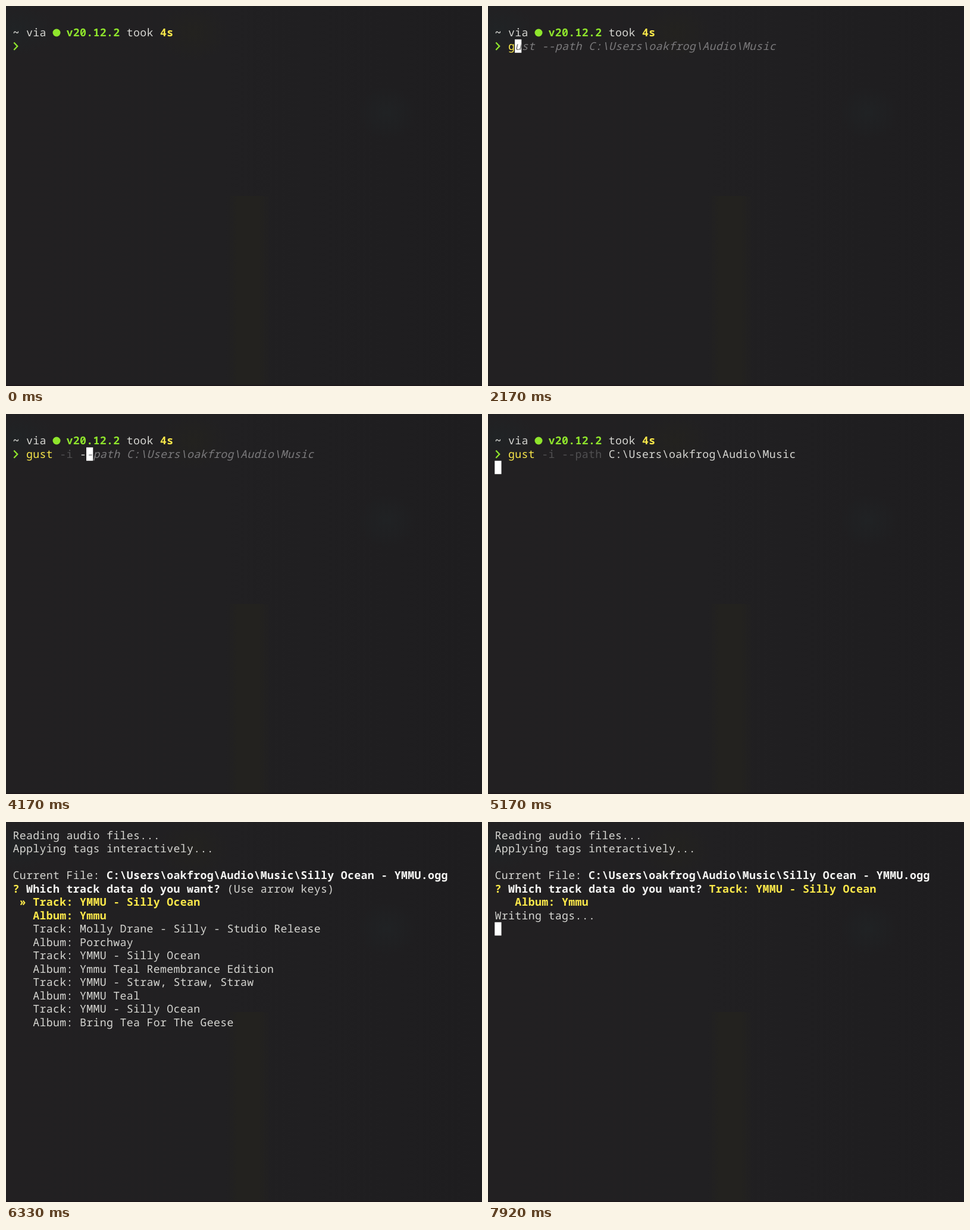
These frames come from a looping animation (800 px wide and 640 px high, 8 s). An HTML page with a canvas:

```html
<!DOCTYPE html>
<html lang="en">
<head>
<meta charset="utf-8">
<title>Terminal session</title>
<style>
  html, body { margin: 0; width: 100%; height: 100%; overflow: hidden; }
  body {
    background:
      linear-gradient(#1d181b, #1d181b) 0 638px / 800px 2px no-repeat,
      radial-gradient(ellipse 70px 45px at 15px 40px, #202325 0%, transparent 100%),
      radial-gradient(ellipse 60px 50px at 315px 45px, #23221f 0%, transparent 100%),
      radial-gradient(ellipse 50px 45px at 640px 180px, #202224 0%, transparent 100%),
      linear-gradient(90deg, transparent 370px, #23221f 390px 425px, transparent 445px) 0 320px no-repeat,
      linear-gradient(90deg, #222022, #212022 45%, #1e1d1f);
  }
  canvas { display: block; }
</style>
</head>
<body>
<canvas id="screen" width="800" height="640"></canvas>
<script>
const ctx = document.getElementById('screen').getContext('2d');
const LOOP = 8000, CW = 11.25, LH = 22.5, PAD = 11.25;
const TEXT = '#d6d6d2', WHITE = '#f6f6f4', GREEN = '#8fe52c', YELLOW = '#fbe84a',
      FLAG = '#504f51', HINT = '#7b7a7c';
const USER_DIR = 'C:\\Users\\oakfrog\\Audio\\Music';
ctx.textRendering = 'geometricPrecision';
ctx.textAlign = 'center';

// Draws text on the character grid and returns the next free column.
function put(row, col, text, color = TEXT, style = '') {
  ctx.font = `${style} 18.2px "Noto Sans Mono", "DejaVu Sans Mono", monospace`;
  ctx.fillStyle = color;
  for (const ch of text) ctx.fillText(ch, PAD + CW * (col++ + 0.5), PAD + LH * row + 17.5);
  return col;
}
const bold = (row, col, text, color = WHITE) => put(row, col, text, color, 'bold');

function cursor(row, col) {
  ctx.fillStyle = '#fff';
  ctx.fillRect(PAD + CW * col, PAD + LH * row, CW, LH);
}

function drawPrompt() {
  bold(1, 0, '~', TEXT);
  put(1, 2, 'via');
  ctx.fillStyle = GREEN;
  ctx.beginPath();
  ctx.arc(85, 45, 6.5, 0, 7);
  ctx.fill();
  bold(1, 8, 'v20.12.2', GREEN);
  put(1, 17, 'took');
  bold(1, 22, '4s', YELLOW);
  ctx.strokeStyle = GREEN;
  ctx.lineWidth = 2.3;
  ctx.beginPath();
  ctx.moveTo(13.3, 61.5);
  ctx.lineTo(19.2, 67.7);
  ctx.lineTo(13.3, 74);
  ctx.stroke();
}

const plainCmd = 'gust --path ' + USER_DIR;
const flagCmd = 'gust -i --path ' + USER_DIR;
// [time, number of typed characters]
const keys = [[2170, 1], [2330, 2], [2580, 3], [2750, 4], [2920, 5], [3250, 6],
              [3580, 7], [3830, 8], [4170, 9], [4330, 10], [4750, flagCmd.length]];

function wordColor(word, index) {
  if (index === 0) return YELLOW;
  return word[0] === '-' && word.length > 1 ? FLAG : TEXT;
}

function drawTyping(t) {
  drawPrompt();
  const typed = keys.reduce((n, [at, count]) => t >= at ? count : n, 0);
  const command = typed < 7 ? plainCmd : flagCmd;
  if (t >= 5170) cursor(3, 0);
  else if (t >= 670) cursor(2, 2 + typed);
  let col = 2;
  command.slice(0, typed).split(' ').forEach((word, i) => {
    col = put(2, col, word, wordColor(word, i)) + 1;
  });
  if (typed) put(2, 2 + typed, command.slice(typed), HINT, 'italic');
}

const choices = [
  ['YMMU - Silly Ocean', 'Ymmu'],
  ['Molly Drane - Silly - Studio Release', 'Porchway'],
  ['YMMU - Silly Ocean', 'Ymmu Teal Remembrance Edition'],
  ['YMMU - Straw, Straw, Straw', 'YMMU Teal'],
  ['YMMU - Silly Ocean', 'Bring Tea For The Geese']
];

function drawTagging(t) {
  put(0, 0, 'Reading audio files...');
  put(1, 0, 'Applying tags interactively...');
  put(3, 0, 'Current File:');
  bold(3, 14, USER_DIR + '\\Silly Ocean - YMMU.ogg');
  if (t < 6250) return cursor(4, 0);

  bold(4, 0, '?', YELLOW);
  bold(4, 2, 'Which track data do you want?');
  if (t >= 7830) {
    const [track, album] = choices[0];
    bold(4, 32, 'Track: ' + track, YELLOW);
    bold(5, 3, 'Album: ' + album, YELLOW);
    put(6, 0, 'Writing tags...');
    return cursor(7, 0);
  }
  put(4, 32, '(Use arrow keys)');
  bold(5, 1, '»', YELLOW);
  choices.forEach(([track, album], i) => {
    const look = i ? [TEXT, ''] : [YELLOW, 'bold'];
    put(5 + 2 * i, 3, 'Track: ' + track, ...look);
    put(6 + 2 * i, 3, 'Album: ' + album, ...look);
  });
}

const start = performance.now();
function frame() {
  const t = (performance.now() - start) % LOOP;
  ctx.clearRect(0, 0, 800, 640);
  if (t < 6000) drawTyping(t);
  else drawTagging(t);
  requestAnimationFrame(frame);
}
frame();
</script>
</body>
</html>
```
